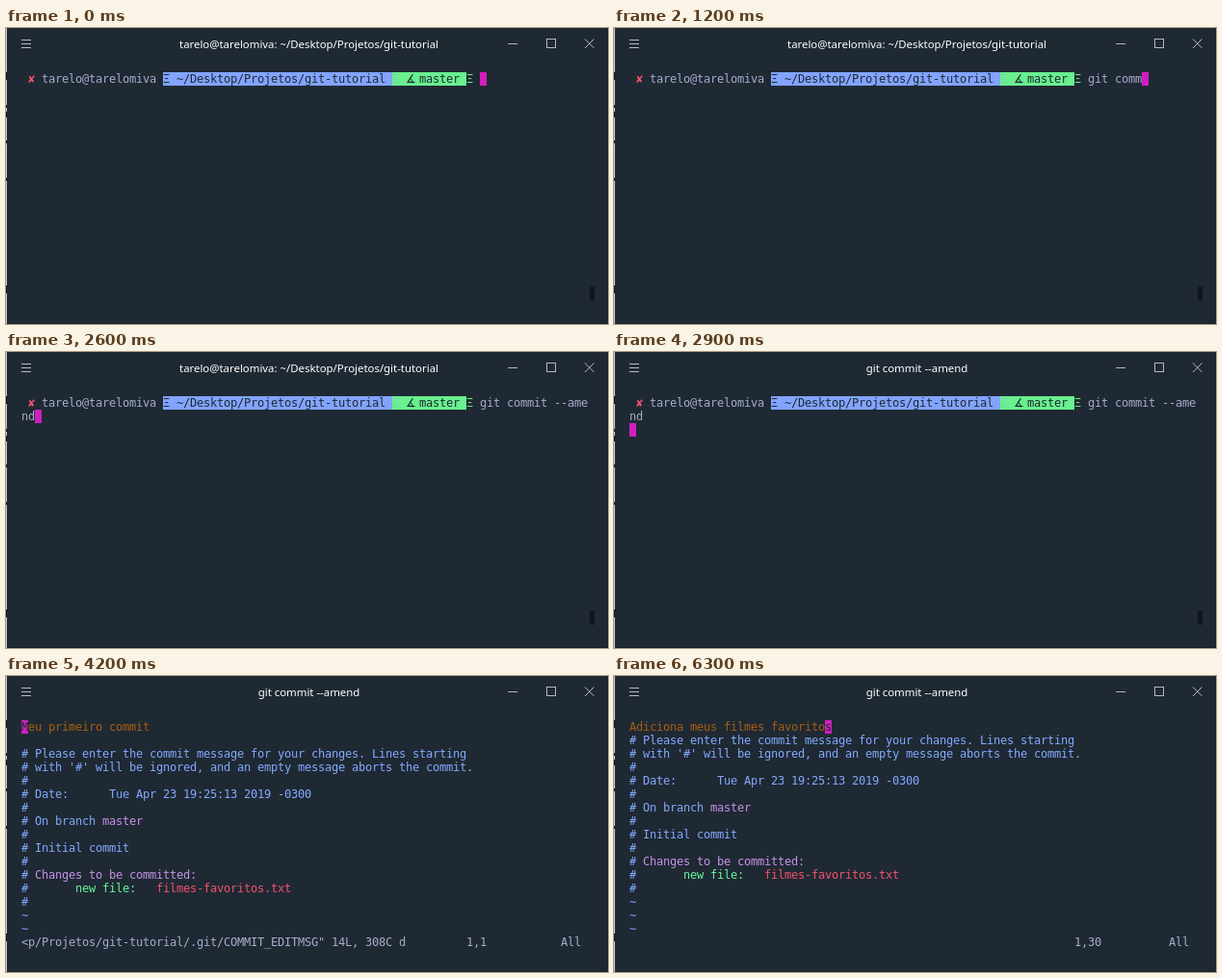
Recreate the animation shown at these times as an HTML page. Size 625 by 308 pixels, loop 8 s.

```html
<!DOCTYPE html>
<html lang="pt">
<head>
<meta charset="utf-8">
<title>git commit --amend</title>
<style>
  html, body { margin: 0; width: 100%; height: 100%; overflow: hidden; background: #1f2933; }
  #win { position: relative; width: 625px; height: 308px; overflow: hidden; background: #1f2933; }
  #title {
    position: absolute; left: 2px; width: 625px; top: 9px; line-height: 16px;
    text-align: center; white-space: pre; color: #fff;
    font-family: "Noto Sans", "Open Sans", sans-serif; font-size: 11.4px;
  }
  svg { position: absolute; left: 0; top: 0; }
  #term span {
    position: absolute; height: 14px; white-space: pre;
    font: 12px/14px "DejaVu Sans Mono", monospace;
    letter-spacing: calc(7px - 1ch);
  }
  #thumb { position: absolute; left: 606px; top: 269px; width: 5px; height: 15px; border-radius: 2px; background: #10161d; }
  .text { color: #a6accd; }
  .note { color: #82aaff; }
  .key { color: #c792ea; }
  .add { color: #69f59a; }
  .file, .fail { color: #f4516c; }
  .head { color: #a85f10; }
  .path { color: #1f2933; background: #82a4ff; }
  .branch { color: #1f2933; background: #69f08f; }
  .joint { color: #82c8c4; }
  .tip { color: #69f08f; }
  .cursor { color: #1f2933; background: #d01fc0; }
</style>
</head>
<body>
<div id="win">
  <div id="title"></div>
  <svg width="625" height="308" fill="none" shape-rendering="crispEdges">
    <path d="M.5 0V308" stroke="#c3c8cc"/>
    <path d="M.5 46v8m0 26v3m0 4v6m0 24v3m0 36v3m0 109v8" stroke="#11161b"/>
    <path d="M1 307.5H625M624.5 0V308" stroke="#161e26"/>
    <path d="M16 12.5h10M16 16.5h10M16 20.5h10M521 16.5h10M561.5 11.5h9v9h-9z" stroke="#b4bac0"/>
    <path d="M601 11.5l9.5 9.5m0-9.5l-9.5 9.5" stroke="#b4bac0" shape-rendering="auto"/>
  </svg>
  <div id="term"></div>
  <div id="thumb"></div>
</div>
<script>
  const LOOP = 8000;
  const COLS = 84, START = 68;
  const COMMAND = "git commit --amend";
  const SHELL_TITLE = "tarelo@tarelomiva: ~/Desktop/Projetos/git-tutorial";
  // [time, characters typed]
  const KEYS = [
    [0, 0], [300, 1], [500, 3], [600, 4], [800, 5], [900, 6], [1200, 8], [1300, 9],
    [1400, 10], [1800, 12], [2000, 13], [2100, 14], [2300, 15], [2400, 16], [2600, 18]
  ];
  const ENTER = 2900, EDITOR = 3000, DELETE_KEY = 4200, DELETED = 4300, WRITTEN = 6300;

  const title = document.getElementById("title");
  const term = document.getElementById("term");
  const thumb = document.getElementById("thumb");

  function put(col, row, text, cls = "text") {
    const cell = document.createElement("span");
    cell.className = cls;
    cell.textContent = text;
    cell.style.left = 16 + col * 7 + "px";
    cell.style.top = 46 + row * 14 + "px";
    cell.style.width = text.length * 7 + "px";
    term.append(cell);
  }

  function drawShell(t) {
    put(1, 0, "✘", "fail");
    put(3, 0, "tarelo@tarelomiva");
    put(21, 0, " ".repeat(34), "path");
    put(21, 0, "Ξ", "path");
    put(23, 0, "~/Desktop/Projetos/git-tutorial", "path");
    put(55, 0, " ".repeat(11), "branch");
    put(55, 0, "Ξ", "joint");
    put(57, 0, "∡", "branch");
    put(59, 0, "master", "branch");
    put(66, 0, "Ξ", "tip");

    const count = KEYS.filter(key => key[0] <= t).pop()[1];
    const room = COLS - START;
    put(START, 0, COMMAND.slice(0, Math.min(count, room)));
    put(0, 1, COMMAND.slice(room, Math.max(count, room)));
    const at = START + count;
    if (t >= ENTER) put(0, 2, " ", "cursor");
    else put(at % COLS, Math.floor(at / COLS), " ", "cursor");
  }

  function drawMessage(top) {
    const notes = [
      "# Please enter the commit message for your changes. Lines starting",
      "# with '#' will be ignored, and an empty message aborts the commit.",
      "#",
      "# Date:      Tue Apr 23 19:25:13 2019 -0300",
      "#", "# On branch", "#", "# Initial commit", "#", "#", "#", "#"
    ];
    notes.forEach((line, i) => put(0, top + i, line, "note"));
    put(12, top + 5, "master", "key");
    put(2, top + 9, "Changes to be committed:", "key");
    put(8, top + 10, "new file:", "add");
    put(20, top + 10, "filmes-favoritos.txt", "file");
    for (let row = top + 12; row < 16; row++) put(0, row, "~", "note");
  }

  function drawEditor(t) {
    let position = "1,1";
    if (t < DELETED) {
      put(0, 0, "Meu primeiro commit", "head");
      put(0, 0, "M", "cursor");
      drawMessage(2);
      put(0, 16, '<p/Projetos/git-tutorial/.git/COMMIT_EDITMSG" 14L, 308C');
      if (t >= DELETE_KEY) put(56, 16, "d");
    } else {
      drawMessage(1);
      if (t < WRITTEN) {
        position = "1,0-1";
        put(0, 0, " ", "cursor");
      } else {
        position = "1,30";
        put(0, 0, "Adiciona meus filmes favoritos", "head");
        put(29, 0, "s", "cursor");
      }
    }
    put(66, 16, position);
    put(80, 16, "All");
  }

  const CHANGES = [...KEYS.map(key => key[0]), ENTER, EDITOR, DELETE_KEY, DELETED, WRITTEN];
  let shown = -1;

  function frame() {
    const t = performance.now() % LOOP;
    const step = CHANGES.filter(time => time <= t).pop();
    if (step !== shown) {
      shown = step;
      term.replaceChildren();
      title.textContent = t < ENTER ? SHELL_TITLE : COMMAND;
      thumb.hidden = t >= EDITOR;
      if (t < EDITOR) drawShell(t);
      else drawEditor(t);
    }
    requestAnimationFrame(frame);
  }
  frame();
</script>
</body>
</html>
```
